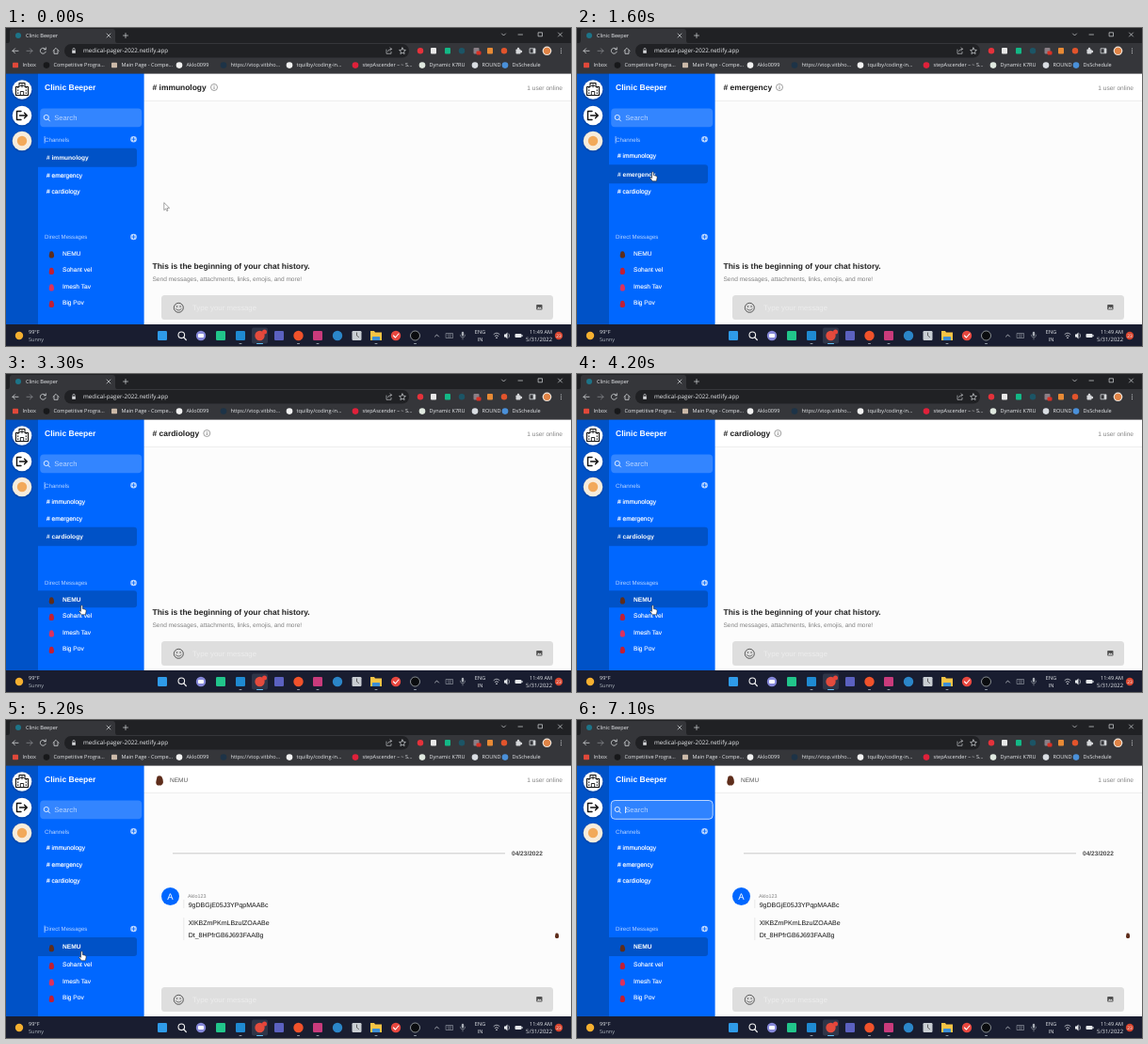
An HTML page that plays this animation: 600x338 px, repeating every 8 s.

```html
<!DOCTYPE html>
<html lang="en">
<head>
<meta charset="utf-8">
<title>Clinic Beeper</title>
<style>
  html, body { margin: 0; width: 100%; height: 100%; overflow: hidden; background: #fcfcfc; }
  svg { display: block; width: 600px; height: 338px; }
  text { white-space: pre; text-rendering: geometricPrecision; }
</style>
</head>
<body>
<svg id="stage" viewBox="0 0 600 338" xmlns="http://www.w3.org/2000/svg"></svg>
<script>
const LOOP = 8000;
const SANS = "'Liberation Sans', Arial, sans-serif";
const UI = "'Open Sans', 'Noto Sans', sans-serif";
const BLUE = '#0067ff', DEEP = '#0052c7', SOFT = '#b9d5ff';
const PAGE = { left: 146.6, top: 48.6, bottom: 315 };

// Drawing helpers. Text is placed by the middle of its capitals.
const rect = (x, y, w, h, fill, r = 0, extra = '') =>
  `<rect x="${x}" y="${y}" width="${w}" height="${h}" rx="${r}" fill="${fill}" ${extra}/>`;
const disc = (x, y, r, fill, extra = '') => `<circle cx="${x}" cy="${y}" r="${r}" fill="${fill}" ${extra}/>`;
const line = (d, stroke, width = 0.8, fill = 'none') =>
  `<path d="${d}" fill="${fill}" stroke="${stroke}" stroke-width="${width}" stroke-linecap="round" stroke-linejoin="round"/>`;
const shape = (d, fill) => `<path d="${d}" fill="${fill}"/>`;
const text = (s, x, y, size, fill, { bold = false, anchor = 'start', font = SANS, heavy = 0 } = {}) =>
  `<text x="${x}" y="${y + size * 0.36}" font-size="${size}" fill="${fill}" font-family="${font}"
    font-weight="${bold ? 700 : 400}" text-anchor="${anchor}" stroke="${fill}" stroke-width="${heavy}">${s}</text>`;
const ui = (s, x, y, size, fill, anchor) => text(s, x, y, size, fill, { font: UI, anchor });
const at = (x, y, content) => `<g transform="translate(${x} ${y})">${content}</g>`;

function browser() {
  const ink = '#d5d7da';
  const bookmarks = [
    [10, '#e0483a', 'Inbox'], [43, '#17181a', 'Competitive Progra...'],
    [115, '#cbb9a8', 'Main Page - Compe...'], [184, '#f2f2f2', 'Aklo0099'],
    [231, '#1d3347', 'https://vtop.vitbho...'], [301, '#f2f2f2', 'tquilby/coding-in...'],
    [371, '#e0213a', 'stepAscender – ~ S...'], [442, '#dfe8df', 'Dynamic K7RU'],
    [498, '#d9dde2', 'ROUND'], [530, '#4a90d9', 'DsSchedule']
  ];
  const extensions = [[440, '#e5323b'], [454, '#e8e8e8'], [469, '#13b886'], [484, '#1c5566'],
    [499.5, '#8a7f86'], [514, '#e88a35'], [529, '#e2542c']];
  return rect(0, 0, 600, PAGE.top, '#35363a') + rect(0, 0, 600, 16, '#202124')
    + shape('M2 16Q4 16 4 13V4Q4 1 7 1H113Q116 1 116 4V13Q116 16 118 16Z', '#35363a')
    + disc(13, 8, 3, '#1d7488') + ui('Clinic Beeper', 21, 7.8, 5.6, '#e8eaed')
    + line('M107 6l4 4m0-4l-4 4M127 5.500v5m-2.500-2.500h5', ink, 0.7)
    + line('M526.500 6l2 2 2-2M544 7h4.500M565.500 4.800h4v4h-4zM586.500 5l4 4m0-4l-4 4', ink, 0.7)
    + rect(62, 17, 366, 14.5, '#202124', 7)
    + line('M13 24.300H7m2.500-2.500L7 24.300l2.500 2.500', ink)
    + line('M22 24.300h6m-2.500-2.500l2.500 2.500-2.500 2.500', '#85878b')
    + line('M42 22.800a3 3 0 1 0 .2 2.500M42.300 20.800v2h-2', ink)
    + line('M50 24.300l3-3 3 3m-5-.5v3.500h4v-3.500', ink)
    + rect(70.2, 23.8, 3.6, 3, ink) + line('M70.900 23.500v-1a1.100 1.100 0 0 1 2.200 0v1', ink, 0.7)
    + ui('medical-pager-2022.netlify.app', 82, 24.2, 6.25, '#e8eaed')
    + line('M404 23v4.300h5v-2M405.500 24.800q.5-2.500 4-2.500m-1.500-1.500l1.500 1.500-1.500 1.500', ink, 0.6)
    + line('M421 21l1 2.200 2.400.3-1.800 1.600.5 2.400-2.100-1.200-2.100 1.200.5-2.400-1.800-1.600 2.400-.3z', ink, 0.7)
    + extensions.map(([x, c], i) => i % 3 ? rect(x - 3, 21, 6, 6.5, c, 1) : disc(x, 24.3, 3.2, c)).join('')
    + rect(499.5, 24.5, 5, 4, '#d93025', 1)
    + rect(541.5, 22.5, 5, 5, ink, 0.8) + disc(544, 22, 1.2, ink) + disc(547, 25, 1.2, ink)
    + line('M556.500 21.800h5.500v5h-5.500z', ink) + rect(559.7, 22, 2.3, 4.7, ink)
    + disc(574.5, 24.3, 4.8, '#f0e6dc') + disc(574.5, 24.3, 3.6, '#e08345')
    + [22, 24.3, 26.6].map(y => disc(589.5, y, 0.6, ink)).join('')
    + bookmarks.map(([x, c, name], i) =>
        (i === 0 || i === 2 ? rect(x - 3, 36.8, 6, 5.5, c, 0.8) : disc(x, 39.6, 3.3, c))
        + ui(name, x + 7.5, 39.4, 5.55, '#e8eaed')).join('');
}

function taskbar() {
  const ink = '#e6e9ec';
  const apps = [[166, '#2f9be8', 1], [207, '#8587d8'], [228, '#21c58b', 1], [249, '#1f8ad2', 1],
    [269.5, '#e34b3d'], [290, '#5b61c0', 1], [310.5, '#f0522b'], [331, '#c93b7c', 1], [352, '#2b86c9'],
    [372.5, '#c9ced3', 1], [414, '#e8473f'], [434.5, '#0a0c0f']];
  return rect(0, PAGE.bottom, 600, 23, '#191d30')
    + disc(14, 327, 4.2, '#f6b030') + ui('99°F', 24, 323.3, 5.5, ink) + ui('Sunny', 24, 331, 5.5, '#aeb6be')
    + rect(261, 318.5, 17, 17, '#2f3548', 2)
    + apps.map(([x, c, square]) => square ? rect(x - 5, 322, 10, 10, c, 1.2) : disc(x, 327, 5.2, c)).join('')
    + disc(434.5, 327, 5, 'none', 'stroke="#aab0b5" stroke-width=".8"')
    + line('M411.500 327l2 2 3.500-4', '#fff', 1.1) + line('M372.500 324v3l2 1.500', '#444', 0.8)
    + rect(204, 325, 6, 4, '#fff', 1)
    + disc(186.3, 326.3, 3.3, 'none', 'stroke="#f2f2f2" stroke-width="1.1"') + line('M188.800 328.800l2.500 2.700', '#f2f2f2', 1.2)
    + shape('M387 322h4l1 1.500h7v8.500h-12z', '#f5c445') + rect(389, 328, 8, 4, '#3d8fd6', 0.5)
    + disc(274.5, 323, 2.5, '#e6443a')
    + [249, 310.5, 331, 393, 434.5].map(x => rect(x - 1.5, 335, 3, 1, '#909aa4', 0.5)).join('')
    + rect(266, 335, 7, 1, '#62c1f4', 0.5)
    + line('M455.500 328l2-2 2 2', ink, 0.7) + line('M467.500 324.500h7v5h-7zM469 326h4M469.500 328h3', '#b9bec6', 0.5)
    + rect(483.8, 322.8, 2.4, 4.7, '#a9aeb6', 1.2) + line('M482.300 326.200q0 2.700 2.700 2.700t2.700-2.700M485 329v2', '#a9aeb6', 0.5)
    + ui('ENG', 503.5, 323.3, 5.6, ink, 'middle') + ui('IN', 503.5, 331, 5.6, ink, 'middle')
    + line('M518 325.500q3-2.800 6 0M519.200 327.300q1.800-1.700 3.600 0', ink, 0.7) + disc(521, 329.3, 0.8, ink)
    + shape('M529 325.500h1.500l2-2v7l-2-2H529z', ink) + line('M534 325q1.500 2 0 4', ink, 0.6)
    + rect(540.5, 325, 7, 4, ink, 1) + rect(547.5, 326, 1, 2, ink)
    + ui('11:49 AM', 580, 323.3, 5.5, ink, 'end') + ui('5/31/2022', 580, 331, 5.9, ink, 'end')
    + disc(587, 327, 4.2, '#d8452f') + ui('23', 587, 327, 4.8, '#fff', 'middle');
}

function sidebar() {
  const badge = (y, fill) => disc(17, y + 0.8, 11.2, '#003f9c', 'opacity=".55"') + disc(17, y, 10.3, fill);
  const plus = y => disc(135.5, y, 3.3, SOFT) + line(`M133.800 ${y}h3.400M135.500 ${y - 1.7}v3.400`, BLUE, 0.8);
  const windows = [62.5, 65.5, 68.5].map(y => rect(12, y, 1.3, 1.3, '#111') + rect(20.7, y, 1.3, 1.3, '#111')).join('');
  return rect(0, 48, 34, 268, DEEP) + rect(34, 48, PAGE.left - 34, 268, BLUE)
    + badge(65.5, '#fff') + line('M10.500 71.500v-9h3.500v-4h6v4h3.500v9z', '#111', 1.1) + windows
    + line('M17 59.700v3.200M15.400 61.300h3.200M15.300 71.500v-4h3.400v4', '#111', 0.9)
    + badge(93, '#fff') + line('M16 88.500h-4.500v9H16M14.500 93H22m-2.500-2.800L22.300 93l-2.800 2.800', '#111', 1.4)
    + badge(120, '#f8ecdc') + disc(17, 120, 5.2, '#f2a95a')
    + text('Clinic Beeper', 41, 63.3, 8.5, '#fff', { bold: true })
    + text('Channels', 41, 118.8, 6.2, SOFT) + text('Direct Messages', 41, 222, 6.1, SOFT)
    + plus(118.2) + plus(222);
}

function composer() {
  return rect(165, 284, 416, 26, '#dedede', 3.5)
    + disc(183.3, 297.3, 5, 'none', 'stroke="#555" stroke-width="1"')
    + disc(181.5, 296, 0.8, '#555') + disc(185.1, 296, 0.8, '#555') + line('M180.500 298.700q2.800 2.800 5.600 0', '#555')
    + text('Type your message', 198, 297.1, 7.8, '#ededed')
    + rect(563.2, 294, 6.3, 5.6, '#505050', 0.8) + shape('M564 298.600l1.500-2 1.100 1.100.9-.9 1.400 1.800z', '#eee');
}

const channels = ['immunology', 'emergency', 'cardiology'];
const people = ['NEMU', 'Sohant vel', 'Imesh Tav', 'Big Pov'];

function figure(x, y, tint, scale = 1) {
  return `<g transform="translate(${x} ${y}) scale(${scale})">`
    + shape('M-2.200-4.200Q0-5.500 2-4.200Q3.500-2 3.600 1.500Q3.200 4 1.500 4.300H-1.800Q-4 3-3.200 0Z', tint) + '</g>';
}

// The selected row is taller, so it and the rows below it move down.
function rows(names, top, active, hover, draw) {
  return names.map((name, i) => {
    const on = i === active, lit = on || i === hover;
    const y = top + i * 17.5 + (on ? 1.7 : active >= 0 && i > active ? 3 : 0);
    const half = on ? 10 : 9;
    const pill = `M34 ${y - half}H136q3 0 3 3v${2 * half - 6}q0 3-3 3H34Z`;
    return (lit ? shape(pill, DEEP) : '') + draw(name, y, lit, i);
  }).join('');
}

function search(focused) {
  const border = focused ? 'stroke="#cfe1ff" stroke-width=".9"' : '';
  return rect(36.2, 85.5, 108, 19.8, focused ? '#2f83ff' : '#3385ff', 4, border)
    + disc(42.8, 95, 2.6, 'none', 'stroke="#fff" stroke-width=".8"') + line('M44.800 97l1.700 1.900', '#fff', 0.8)
    + text('Search', 51.3, 95.5, 7.6, SOFT)
    + (focused ? rect(51, 92, 0.8, 7, '#fff') : '');
}

function channelView(name, infoX) {
  return text('# ' + name, 155.5, 62.8, 8.45, '#1c1c1c', { bold: true })
    + disc(infoX, 63, 3.5, 'none', 'stroke="#777" stroke-width=".7"')
    + rect(infoX - 0.4, 62.4, 0.8, 2.6, '#777') + rect(infoX - 0.4, 60.9, 0.8, 0.8, '#777')
    + text('This is the beginning of your chat history.', 155.5, 252.6, 8.45, '#222', { bold: true })
    + text('Send messages, attachments, links, emojis, and more!', 155.5, 266.5, 6.55, '#808080');
}

function directView() {
  const messages = [['9gDBGjE05J3YPqpMAABc', 196.3], ['XlKBZmPKmLBzulZOAABe', 215], ['Dt_8HPfrGB6J693FAABg', 228.3]];
  return figure(163, 64.7, '#5e2d1b', 1.1) + text(people[0], 174, 63.2, 6.5, '#555')
    + rect(177, 141.3, 353, 1, '#c9c9c9') + text('04/23/2022', 537, 141.8, 6.55, '#4a4a4a', { bold: true })
    + disc(174.5, 187.5, 9.5, BLUE) + text('A', 174.5, 187.5, 9.5, '#fff', { anchor: 'middle' })
    + rect(188.5, 191, 0.7, 9, '#e2e2e2') + rect(188.5, 210, 0.7, 24, '#e2e2e2')
    + text('Aklo123', 193, 186.8, 5.4, '#808080')
    + messages.map(([s, y]) => text(s, 193.7, y, 7, '#111')).join('')
    + figure(585, 229.3, '#5e2d1b', 0.6);
}

const pointers = {
  arrow: line('M0 0v7.600l1.800-1.600 1.200 2.500 1.200-.5-1.100-2.500 2.300-.2z', '#666', 0.6, '#fff'),
  hand: line('M0 0q1-.5 1.300.5v3l3 .8q1 .4.8 1.800l-.7 3.700H0.200L-2.300 6.500q-.2-1 1-.8l.8.700V.8z', '#222', 0.6, '#fff')
};

// Each track lists [start in ms, value...]; values hold until the next start.
const track = (steps, t) => steps.filter(s => s[0] <= t).pop().slice(1);
const cursorTrack = [
  [0, 167.8, 186, 'arrow'], [500, 143, 169, 'arrow'], [800, 100, 160, 'hand'], [900, 81, 154, 'hand'],
  [1100, 80, 153, 'hand'], [2000, 79, 162, 'hand'], [2100, 78, 167, 'hand'], [2200, 78, 169.5, 'hand'],
  [2800, 79, 180, 'hand'], [3300, 80, 246, 'hand'], [5800, 81, 88.5, 'arrow'], [7100, 0, 0, '']
];
// Rows 0 to 2 are channels, row 3 onwards are people.
const activeTrack = [[0, 0], [1600, 1], [2700, 2], [4500, 3]];
const hoverTrack = [[0, -1], [800, 1], [2000, 2], [3300, 3], [5800, -1]];
const caretTrack = [[0, 115], [500, 0], [900, 115], [1100, 0], [1600, 115], [2000, 0],
  [3300, 115], [3700, 0], [5000, 218.5], [5800, 0], [6000, 218.5], [7100, 0]];

function scene(t) {
  const [active] = track(activeTrack, t), [hover] = track(hoverTrack, t);
  const [caretY] = track(caretTrack, t), [x, y, pointer] = track(cursorTrack, t);
  const tints = ['#5e2d1b', '#c01f35', '#dd315d', '#c01f35'];
  return search(t >= 7100)
    + rows(channels, 136, active < 3 ? active : -1, hover, (name, y, lit) =>
        text('# ' + name, 43, y, 6.6, '#fff', { bold: lit, heavy: lit ? 0 : 0.18 }))
    + rows(people, 239.3, active - 3, hover - 3, (name, y, lit, i) =>
        figure(48.3, y + 1.8, tints[i], 0.78) + text(name, 60, y, 6.6, '#fff', { bold: lit, heavy: lit ? 0 : 0.12 }))
    + (active < 3 ? channelView(channels[active], [221, 215, 213.3][active]) : directView())
    + (caretY ? rect(40.7, caretY, 0.7, 7.5, '#cfe0ff') : '')
    + (pointer ? at(x, y, pointers[pointer]) : '');
}

const stage = document.getElementById('stage');
stage.innerHTML = rect(146, 48, 454, 268, '#fcfcfc') + rect(146, 48, 454, 29.5, '#fff')
  + rect(146, 77, 454, 0.8, '#ececec') + sidebar() + composer()
  + text('1 user online', 591, 63.2, 6.6, '#858585', { anchor: 'end' })
  + browser() + taskbar() + '<g id="live"></g>';
const live = document.getElementById('live');

let shown = '';
function frame() {
  const next = scene(performance.now() % LOOP);
  if (next !== shown) live.innerHTML = shown = next;
  requestAnimationFrame(frame);
}
frame();
</script>
</body>
</html>
```
